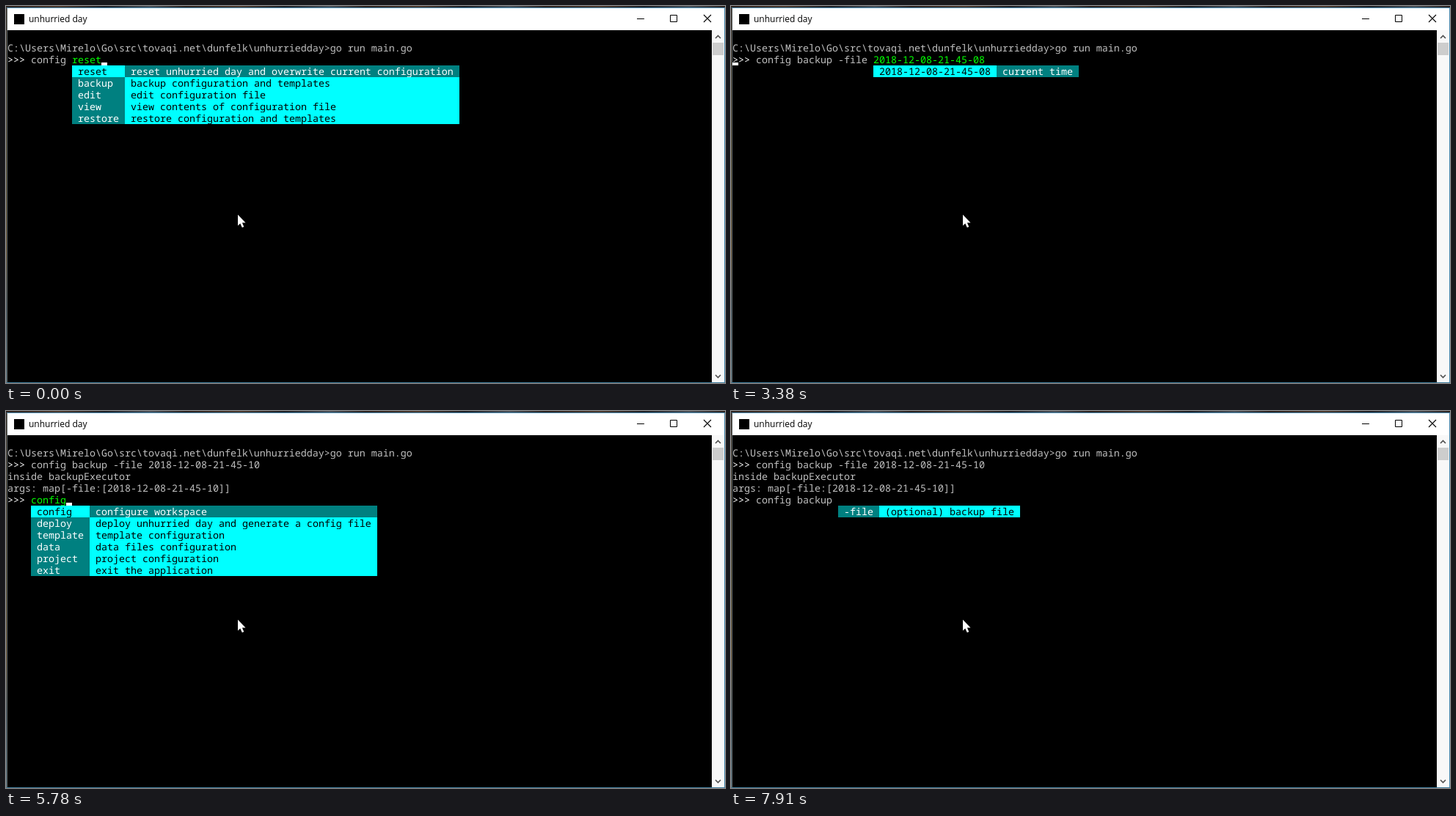
An HTML page that plays this animation: 980x514 px, repeating every 8 s.

```html
<!DOCTYPE html>
<html lang="en">
<head>
<meta charset="utf-8">
<title>unhurried day</title>
<style>
  html, body { margin: 0; width: 100%; height: 100%; overflow: hidden; background: #000; }
  svg { display: block; width: 980px; height: 514px; }
  text { white-space: pre; }
  #term { font: 13.3333px "Noto Sans Mono", "DejaVu Sans Mono", monospace; text-rendering: geometricPrecision; }
  .title { font: 12px "Open Sans", "Noto Sans", sans-serif; }
  .line { fill: none; stroke: #000; }
  .arrow { fill: none; stroke: #505050; stroke-width: 1.6; }
</style>
</head>
<body>
<svg viewBox="0 0 980 514">
  <defs>
    <linearGradient id="top" spreadMethod="repeat" gradientUnits="userSpaceOnUse" x1="0" y1="0" x2="245" y2="0">
      <stop offset="0" stop-color="#2a2220"/><stop offset=".3" stop-color="#4a3a30"/>
      <stop offset=".55" stop-color="#1c2026"/><stop offset=".8" stop-color="#46505a"/>
      <stop offset="1" stop-color="#2a2220"/>
    </linearGradient>
    <linearGradient id="side" x1="0" y1="0" x2="0" y2="1">
      <stop offset="0" stop-color="#3a3028"/><stop offset=".45" stop-color="#54492c"/>
      <stop offset=".65" stop-color="#6a5230"/><stop offset=".8" stop-color="#42525c"/>
      <stop offset="1" stop-color="#5a7480"/>
    </linearGradient>
  </defs>
  <rect width="980" height="514" fill="#000"/>
  <rect width="980" height="2" fill="url(#top)"/>
  <rect y="2" width="1" height="512" fill="url(#side)"/>
  <rect x="1" y="2" width="1" height="511" fill="#5f6668"/>
  <rect x="1" y="2" width="979" height="1" fill="#4a8ab0"/>
  <rect x="979" y="2" width="1" height="512" fill="#4a8ab0"/>
  <rect x="1" y="513" width="979" height="1" fill="#3f7c9c"/>

  <rect x="2" y="3" width="977" height="30" fill="#fff"/>
  <rect x="11" y="11" width="14" height="14" fill="#000"/>
  <text class="title" x="31" y="22">unhurried day</text>
  <path class="line" d="M860 17.5h10M905.5 12.5h9v9h-9z"/>
  <path class="line" d="M951 12l10 10M961 12l-10 10" stroke-width="1.1"/>

  <rect x="962" y="33" width="17" height="480" fill="#f8f8f8"/>
  <rect x="963" y="50" width="15" height="17" fill="#cdcdcd"/>
  <path class="arrow" d="M967 44l3.5-3.5 3.5 3.5M967 503l3.5 3.5 3.5-3.5"/>

  <g id="term"></g>
  <path d="M316 284.5V299.5L319.3 296.4 321.8 302 324.3 301 321.9 295.5H326.5z" fill="#fff"/>
</svg>
<script>
const LOOP = 8000, CELL = 8, ROW = 16, LEFT = 2, TOP = 33;
const GREY = '#c0c0c0', WHITE = '#fff', GREEN = '#0f0', CYAN = '#0ff', TEAL = '#008080', BLACK = '#000';
const DATE = '2018-12-08-21-45-';

// Suggestions keyed by the text typed so far
const menus = {
  '': [
    ['config', 'configure workspace'],
    ['deploy', 'deploy unhurried day and generate a config file'],
    ['template', 'template configuration'],
    ['data', 'data files configuration'],
    ['project', 'project configuration'],
    ['exit', 'exit the application']
  ],
  'config ': [
    ['reset', 'reset unhurried day and overwrite current configuration'],
    ['backup', 'backup configuration and templates'],
    ['edit', 'edit configuration file'],
    ['view', 'view contents of configuration file'],
    ['restore', 'restore configuration and templates']
  ],
  'config backup ': [['-file', '(optional) backup file']]
};
const CFG = 'config ', BAK = CFG + 'backup ', FILE = BAK + '-file ';
const OFF = 0, ON = 1, HOME = 2;

// time, prompt row, typed text, selected item, caret, seconds on the clock
const steps = [
  [0, 2, CFG, 0, ON],
  [120, 2, CFG, 1, ON],
  [1070, 2, CFG, 1, HOME],
  [1180, 2, BAK, -1, ON],
  [1550, 2, BAK, -1, OFF],
  [1670, 2, BAK, 0, ON],
  [2040, 2, FILE, -1, OFF, '08'],
  [2540, 2, FILE, 0, ON, '08'],
  [3120, 2, FILE, 0, OFF, '08'],
  [3380, 2, FILE, 0, HOME, '08'],
  [3490, 2, FILE, -1, ON, '09'],
  [3610, 2, FILE, -1, OFF, '09'],
  [3860, 2, FILE, -1, ON, '10'],
  [4230, 2, FILE, -1, OFF, '10'],
  [4350, 2, FILE, 0, ON, '10'],
  [4980, 5, '', -1, ON],
  [5210, 5, '', -1, OFF],
  [5780, 5, '', 0, ON],
  [6240, 5, '', 0, OFF],
  [6500, 5, '', 0, HOME],
  [6610, 5, CFG, -1, ON],
  [6860, 5, CFG, -1, OFF],
  [7110, 5, CFG, 0, ON],
  [7360, 5, CFG, 1, ON],
  [7670, 5, BAK, -1, ON],
  [7910, 5, BAK, -1, OFF]
];

const px = col => LEFT + col * CELL;
const py = row => TOP + row * ROW;
const esc = s => s.replace(/&/g, '&amp;').replace(/</g, '&lt;').replace(/>/g, '&gt;');
const put = (col, row, s, fill) =>
  `<text x="${px(col)}" y="${py(row) + 13}" fill="${fill}">${esc(s)}</text>`;
const fillCells = (col, row, n, fill) =>
  `<rect x="${px(col)}" y="${py(row)}" width="${n * CELL}" height="${ROW}" fill="${fill}"/>`;
const prompt = (row, typed, picked = '') =>
  put(0, row, '>>>', WHITE) + put(4, row, typed, GREY) + put(4 + typed.length, row, picked, GREEN);
const widest = (items, i) => Math.max(...items.map(it => it[i].length)) + 2;

function drawMenu(items, col, row, sel) {
  const w = widest(items, 0), w2 = widest(items, 1);
  return items.map(([name, note], i) => {
    const on = i === sel, y = row + i;
    return fillCells(col, y, w, on ? CYAN : TEAL) + fillCells(col + w, y, w2, on ? TEAL : CYAN) +
      put(col + 1, y, name, on ? BLACK : WHITE) + put(col + w + 1, y, note, on ? WHITE : BLACK);
  }).join('');
}

function drawStep([, row, typed, sel, caret, secs]) {
  const items = menus[typed] || [[DATE + secs, 'current time']];
  const picked = sel < 0 ? '' : items[sel][0];
  const col = 4 + typed.length;
  let out = put(0, 1, 'C:\\Users\\Mirelo\\Go\\src\\tovaqi.net\\dunfelk\\unhurriedday>go run main.go', GREY);
  if (row > 2) {
    out += prompt(2, FILE + DATE + '10') +
      put(0, 3, 'inside backupExecutor', GREY) +
      put(0, 4, `args: map[-file:[${DATE}10]]`, GREY);
  }
  out += prompt(row, typed, picked) + drawMenu(items, col, row + 1, sel);
  if (caret !== OFF) {
    const at = caret === HOME ? 0 : col + picked.length;
    out += `<rect x="${px(at)}" y="${py(row) + 12}" width="8" height="4" fill="${WHITE}"/>`;
  }
  return out;
}

const term = document.getElementById('term');
const start = performance.now();
let shown = -1;

function tick() {
  const t = (performance.now() - start) % LOOP;
  let i = steps.length - 1;
  while (i > 0 && steps[i][0] > t) i--;
  if (i !== shown) {
    term.innerHTML = drawStep(steps[i]);
    shown = i;
  }
  requestAnimationFrame(tick);
}
tick();
</script>
</body>
</html>
```
